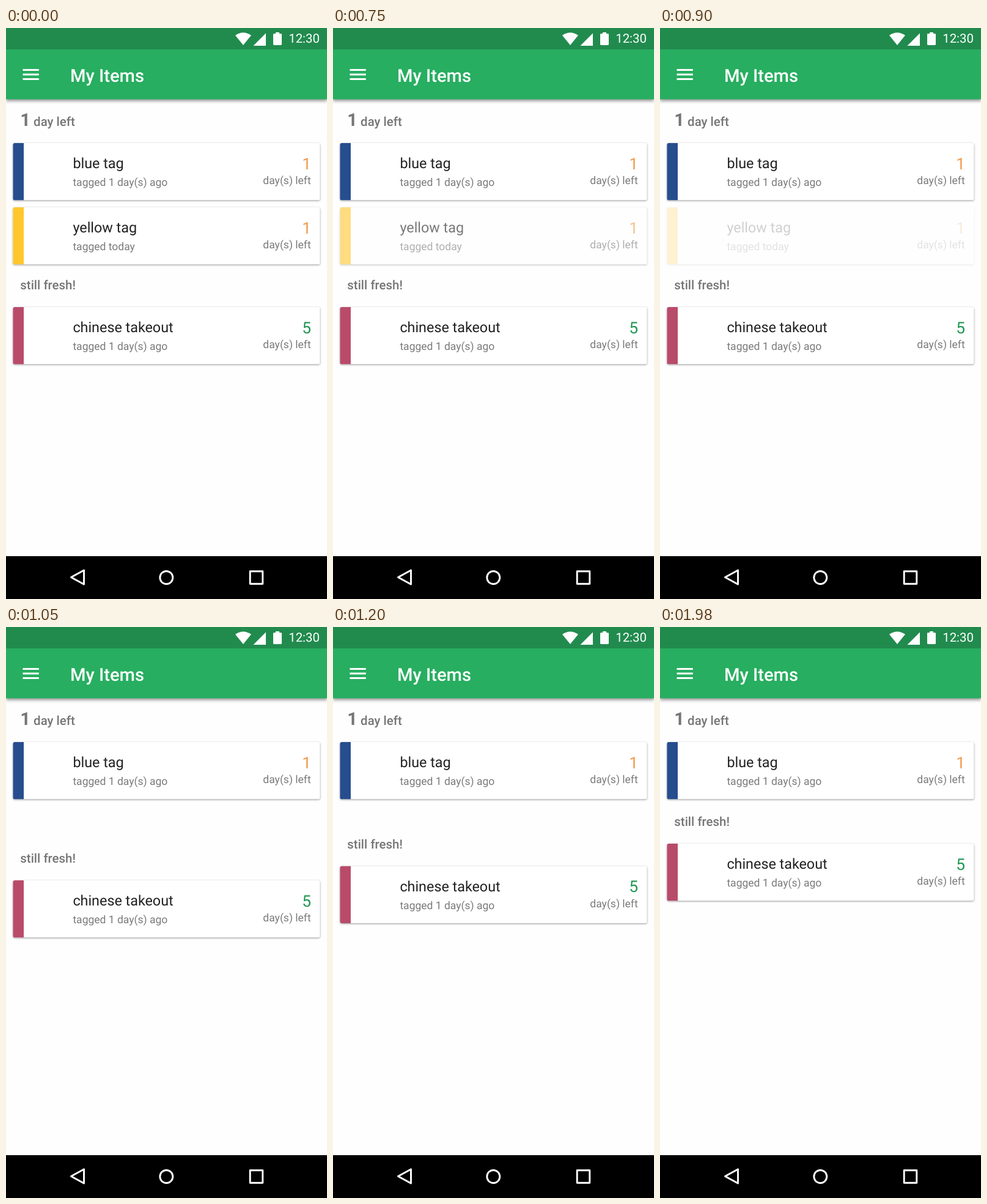
Write an HTML page that moves like this. It is 525 by 933 pixels and loops after 2400 ms.

```html
<!DOCTYPE html>
<html lang="en">
<head>
<meta charset="utf-8">
<title>My Items</title>
<style>
  html, body { margin: 0; width: 100%; height: 100%; overflow: hidden; background: #fefefe; }
  svg { display: block; width: 525px; height: 933px; font-family: Roboto, sans-serif; text-rendering: geometricPrecision; }
  .card { fill: #fff; filter: drop-shadow(0 1.5px 1.4px rgba(0, 0, 0, .42)); }
  .bar { fill: #27ae60; filter: drop-shadow(0 3px 2.5px rgba(0, 0, 0, .4)); }
  .name { font-size: 23.33px; fill: #212121; }
  .note { font-size: 17.5px; fill: #7a7a7a; }
  .count { font-size: 26.25px; }
  .head { font-size: 20.42px; font-weight: 500; fill: #757575; }
  .end { text-anchor: end; }
</style>
</head>
<body>
<svg viewBox="0 0 525 933">
  <rect width="525" height="933" fill="#fefefe"/>
  <g id="list"></g>

  <rect class="bar" y="30" width="525" height="86.5"/>
  <rect width="525" height="35" fill="#218b4e"/>
  <g fill="#fff">
    <path d="M388 28 375 12Q388 3 401 12Z"/>
    <path d="M425 8.5V29H404.500Z"/>
    <path d="M441 7h6v2.300h2.700q1.300 0 1.300 1.300v16q0 1.400-1.300 1.400h-11.400q-1.300 0-1.300-1.400v-16q0-1.300 1.300-1.300h2.700Z"/>
    <text x="513" y="23.500" font-size="20.42" class="end">12:30</text>
    <path d="M27.500 67h26.300v2.900H27.500ZM27.500 74.500h26.300v2.900H27.500ZM27.500 82h26.300v2.900H27.500Z"/>
    <text x="105" y="87.500" font-size="29.17" font-weight="500">My Items</text>
  </g>

  <rect y="863" width="525" height="70"/>
  <g fill="none" stroke="#fff" stroke-width="2.9" stroke-linejoin="round">
    <path d="M106.500 897.500 127.500 886V909Z"/>
    <circle cx="262.300" cy="898" r="10.500"/>
    <rect x="399.200" y="887.700" width="20.600" height="20.600"/>
  </g>
</svg>
<script>
const LOOP = 2400, TICK = 150, START = 600;
const SLIDE = [0, 0, 0, 42, 65.3, 102];
const ORANGE = '#f2994a', GREEN = '#219653';

const card = (y, tag, name, note, days, color) => `
  <g transform="translate(0 ${y})">
    <rect class="card" x="11.500" width="502" height="93.300" rx="2.900"/>
    <path d="M29 0H14.400q-2.900 0-2.900 2.900v87.500q0 2.900 2.900 2.900H29Z" fill="${tag}"/>
    <text class="name" x="109.400" y="41">${name}</text>
    <text class="note" x="109.400" y="70">${note}</text>
    <text class="count end" x="499" y="42.500" fill="${color}">${days}</text>
    <text class="note end" x="498.700" y="67">day(s) left</text>
  </g>`;

const list = document.getElementById('list');
list.innerHTML = `
  <text class="head" x="23.300" y="160"><tspan font-size="29.17" font-weight="700">1</tspan> day left</text>
  ${card(188, '#264d8e', 'blue tag', 'tagged 1 day(s) ago', 1, ORANGE)}
  <g id="removed">${card(293, '#fec72d', 'yellow tag', 'tagged today', 1, ORANGE)}</g>
  <g id="fresh">
    <text class="head" x="23.300" y="427">still fresh!</text>
    ${card(456, '#b94b6a', 'chinese takeout', 'tagged 1 day(s) ago', 5, GREEN)}
  </g>`;
const removed = document.getElementById('removed');
const fresh = document.getElementById('fresh');

// The card fades out, then the section below closes the gap, in 150 ms steps.
function draw(now) {
  const tick = Math.floor((now % LOOP - START) / TICK);
  const step = Math.min(Math.max(tick, 0), SLIDE.length - 1);
  removed.setAttribute('opacity', Math.max(0, 1 - 0.4 * step));
  fresh.setAttribute('transform', `translate(0 ${-SLIDE[step]})`);
}

let start;
function frame(now) {
  start ??= now;
  draw(now - start);
  requestAnimationFrame(frame);
}
draw(0);
requestAnimationFrame(frame);
</script>
</body>
</html>
```
